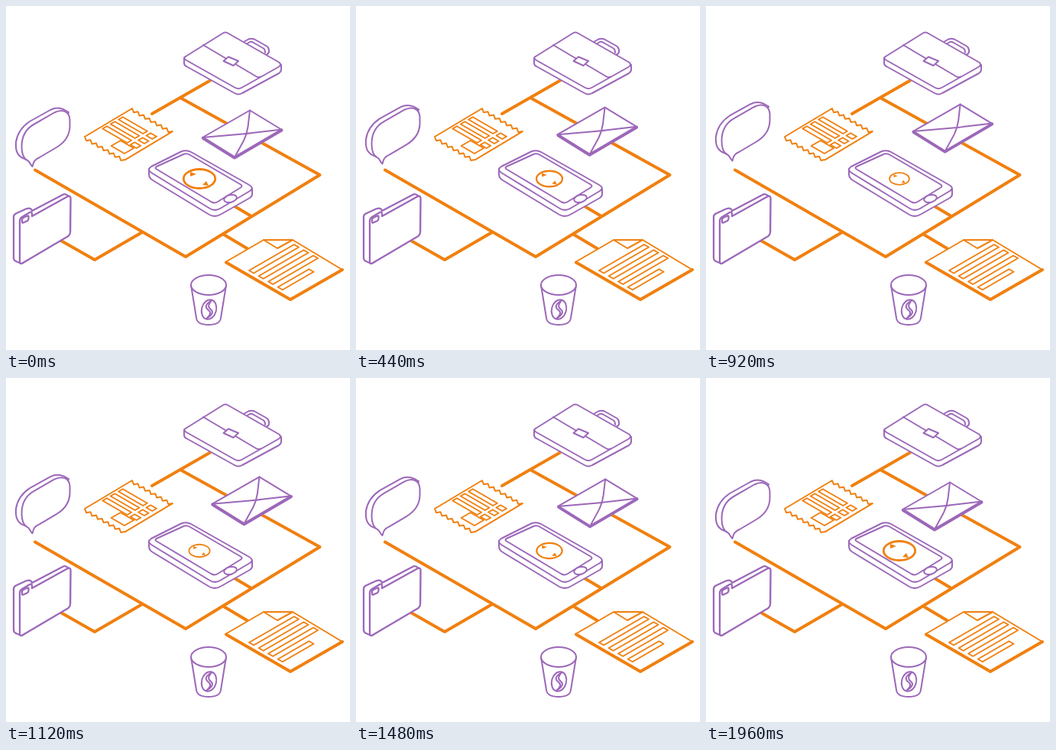
These frames come from a looping animation (450 by 450 pixels, 2 s). An HTML page:

```html
<!DOCTYPE html>
<html lang="en">
<head>
<meta charset="utf-8">
<title>Isometric office</title>
<style>
html, body { margin: 0; height: 100%; overflow: hidden; background: #fff; }
svg { display: block; width: 100%; height: 100%; }
g { fill: #fff; stroke-width: 2; stroke-linejoin: round; stroke-linecap: round; }
.purple { stroke: #9c68b9; }
.orange { stroke: #f08010; }
.line { fill: none; }
.thick { fill: none; stroke-width: 4; }
.bold { stroke-width: 2.3; }
</style>
</head>
<body>
<svg viewBox="0 0 450 450">
  <g class="orange">
    <path class="thick" d="M38 214.500L235 328 410.500 221 228 120M267 97.500L191 141M299 262L321 275M285 299L316 317.500M178 296L116 332 72 307"/>
  </g>

  <!-- briefcase -->
  <g class="purple">
    <path class="line" d="M311 47L317 43.500Q321 42 325 43.500L341 52.500Q344 54.500 344 58V60Q344 62 341 63.500M315 49.500L319 47Q321 46.500 323 47.500L337 55.500Q339 57 339 61"/>
    <path d="M233 68V74.500Q233 77.500 236 79L299 114Q304 117 309 114L357 88Q360 86 360 83V77L290 50Z"/>
    <path d="M235 66L283 36Q287 33 291 36L357 73.500Q361 76.500 357 79.500L309 106.500Q304 109.500 299 106.500L236 71Q231 68 235 66Z"/>
    <path class="line" d="M258 51L327 92Q330 94 333 92.500"/>
    <path d="M284.500 72L291 66.500 304 72 297.500 78Z"/>
  </g>

  <g class="orange" id="receipt"></g>

  <!-- folder -->
  <g class="purple bold">
    <path d="M20 337L12 333.500Q10 332 10 330V276Q10 273 13 271.500L26 265.500Q33 263 34 268L74 247Q77 245 80 247.500L84 250V295L22 336Z"/>
    <path d="M18 334V281Q18 278 21 276L31 270Q34 268.500 34 272V275L80 249.500Q85 247 84.500 253L84 296Q84 299 81.500 301L23 335.500Q18 339 18 334Z"/>
    <path d="M21 280Q21 278 22.500 277L28 274.500Q29.500 274 29.500 275.500V278Q29.500 280 28 281L22.500 283.500Q21 284 21 282Z"/>
  </g>

  <!-- phone -->
  <g class="purple">
    <path d="M187 213V220Q187 225 192 228L266 273Q273 277 281 272.500L319 251Q322 249 322 246V239L237 200Z"/>
    <path d="M190 210L229 190.500Q236 187.500 243 191.500L318 234Q325 238 319 242L280 265Q273 269 266 264.500L190 218Q184 214 190 210Z"/>
    <path d="M197 210L231 194.500Q236 192 241 195L307 233.500Q310 235.500 307 237.500L277 256Q273 258.500 269 256.500L197 213.500Q194 211.500 197 210Z"/>
    <ellipse cx="293.500" cy="252" rx="8.500" ry="4.800" transform="rotate(-14 293.500 252)"/>
  </g>
  <g class="orange" id="dial">
    <ellipse rx="20.700" ry="12.500" stroke-width="2.800"/>
    <path fill="#f08010" stroke="none" d="M-12-9L-4-6-12-3ZM12 9L4 8 9 3Z"/>
  </g>

  <g class="orange" id="sheet">
    <path d="M287 335L337 306H375L440 345 372 384Z"/>
    <path class="line" d="M337 306L355 317 375 306"/>
    <path class="thick" d="M288 335.500L372 384 440 345"/>
  </g>

  <!-- cup -->
  <g class="purple">
    <path d="M242 365L249 408Q250 417 265 417T281 408L288 365Z"/>
    <ellipse cx="265" cy="365" rx="23" ry="13"/>
    <ellipse cx="265.500" cy="397" rx="9.500" ry="13" transform="rotate(15 265.500 397)"/>
    <path class="line" d="M269 385C259 391 261 395 265 398S267 405 262 409M269 385C264 391 264 394 268 397S270 404 262 409"/>
  </g>

  <g class="purple" id="bubble">
    <path d="M29 202L20 198C13 193 12.500 186 13 178C15 165 22 157 31 151L58 136Q67 131.500 76 135.500L82 139 70 170Z"/>
    <path d="M20.500 184C20.500 169 27 160 37 154.500L63 139.500C74 134 83 138 83.500 149V158C83 170 76 179 66 185L44 198C37 201 36 204 34.500 210C31 207 31 203 28 202C22 199 20.500 193 20.500 184Z"/>
  </g>

  <g class="purple" id="envelope">
    <path d="M257 172L319 136.500 361 162 299 198Z"/>
    <path class="line" d="M257 172L309 167.500Q316 167 322 166L361 161.500M319 136.500L316.500 158Q315 168 311 176L299 198"/>
    <path class="thick" d="M258 173L299 198.500 360.500 162.500"/>
  </g>
</svg>
<script>
const $ = id => document.getElementById(id);

// Isometric rectangle: u runs down-right, v runs up-right from (x, y).
function isoRect(x, y, u, v, w, h) {
  const at = (a, b) => `${x + .866 * (a + b)} ${y + .5 * (a - b)}`;
  return `M${at(u, v)}L${at(u, v + h)} ${at(u + w, v + h)} ${at(u + w, v)}Z`;
}

function addPath(id, d) {
  const path = document.createElementNS('http://www.w3.org/2000/svg', 'path');
  path.setAttribute('d', d);
  $(id).append(path);
}

const teeth = 'l2 5.200l5.550 -.900'.repeat(7);
addPath('receipt', `M103 171L165 134${teeth}L156 201.100M103 171${teeth}`);
for (const v of [24, 36, 48]) {
  addPath('receipt', isoRect(103, 171, 3, v, 37, 6.5));
  addPath('receipt', isoRect(103, 171, 45, v, 9, 6.5));
}
addPath('receipt', isoRect(103, 171, 32, 8, 20, 14));

[68, 68, 68, 47].forEach((length, i) =>
  addPath('sheet', isoRect(318, 346, i * 14.5, 0, 7, length)));

const start = performance.now();

function draw(now) {
  const step = Math.floor(Math.max(0, now - start) / 40) % 50;
  const p = 1 - Math.abs(step / 24.5 - 1);
  const move = (id, value) => $(id).setAttribute('transform', value);
  move('envelope', `translate(${14.5 * p} ${-8.4 * p})`);
  move('bubble', `translate(0 ${-8 * p})`);
  move('dial', `translate(253 226) scale(${1 - .4 * p})`);
  requestAnimationFrame(draw);
}
draw(start);
</script>
</body>
</html>
```
